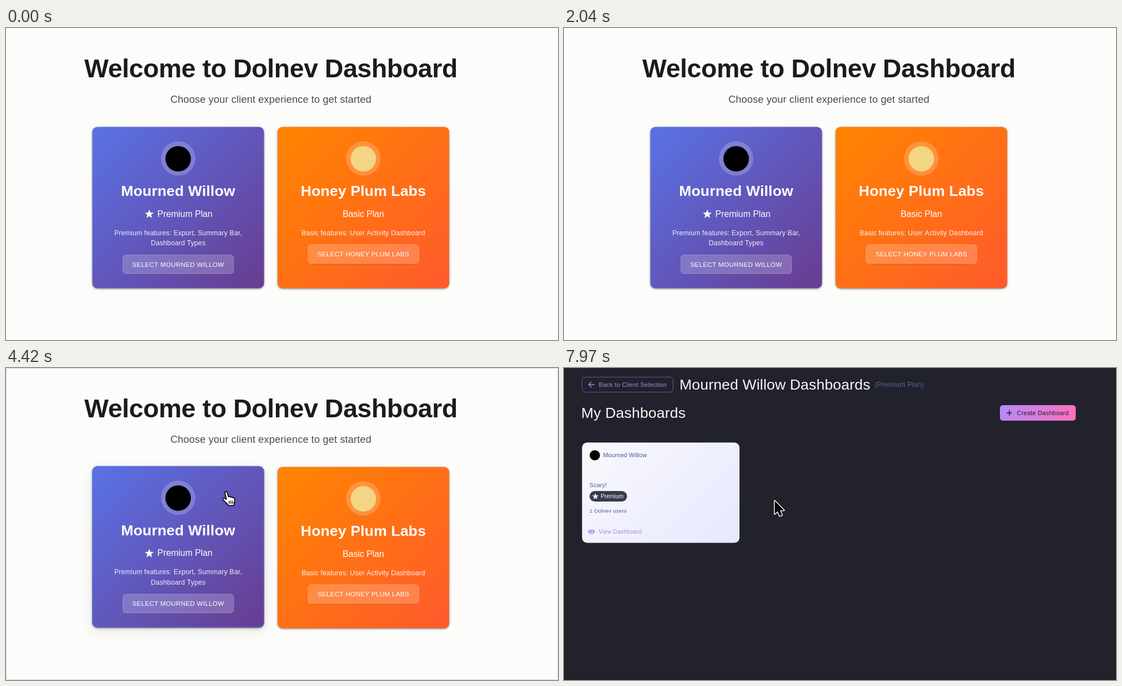
An HTML page with a canvas that plays this animation: 994x563 px, repeating every 7990 ms.

```html
<!DOCTYPE html>
<html lang="en">
<head>
<meta charset="utf-8">
<title>Dashboard selection</title>
<style>
  html, body { margin: 0; width: 100%; height: 100%; overflow: hidden; background: #fcfcfb; }
  canvas { display: block; width: 994px; height: 563px; }
</style>
</head>
<body>
<canvas id="stage"></canvas>
<script>
const W = 994, H = 563, LOOP = 7990;
const HOVER_AT = 4290, LOAD_AT = 6140, READY_AT = 6480;
const PREMIUM = 'Mourned Willow', BASIC = 'Honey Plum Labs', SERVICE = 'Dolnev';

const canvas = document.getElementById('stage');
const ctx = canvas.getContext('2d');
const dpr = window.devicePixelRatio || 1;
canvas.width = Math.round(W * dpr);
canvas.height = Math.round(H * dpr);

const clamp = v => Math.max(0, Math.min(1, v));
const ease = v => { v = clamp(v); return v * v * (3 - 2 * v); };
const span = (t, a, b) => clamp((t - a) / (b - a));

// Cursor hotspot: time, x, y
const cursorPath = [
  [2480, 640, -30], [2880, 576, 33], [3400, 556, 72],
  [4150, 482, 160], [4290, 440, 188], [4420, 396, 218], [4800, 379, 239]
];
const arrow = new Path2D('M0 0V23.5L5.3 18.6L9 27.2L13 25.5L9.3 17H16.6Z');
const hand = new Path2D('M4.2 3.2C4 .8 7.6 .2 8.4 2.6L10.6 10.4C12 9.4 13.8 9.8 14.4 11C15.6 10.2 17.4 10.6 18 12C19.6 11.4 21.2 12.2 21.6 14C22.4 17 22 20 20.6 22.6V26H10.2L9.8 24.4C7.4 22 4 18.6 1.2 16C-.4 14.2 1.4 12 3.6 13L7 15Z');
const fingers = new Path2D('M12 17.5V23M15 17.5V23M18 17.5V23');

function text(str, x, y, size, color, { align = 'left', weight = 400, ls = 0 } = {}) {
  ctx.font = `${weight} ${size}px "Liberation Sans", Arial, sans-serif`;
  ctx.letterSpacing = `${ls * size}px`;
  ctx.textAlign = align;
  ctx.fillStyle = color;
  ctx.fillText(str, x, y);
}

function box(x, y, w, h, r, fill, stroke, line = 1) {
  ctx.beginPath();
  ctx.roundRect(x, y, w, h, r);
  if (fill) { ctx.fillStyle = fill; ctx.fill(); }
  if (stroke) { ctx.strokeStyle = stroke; ctx.lineWidth = line; ctx.stroke(); }
}

function disc(x, y, r, fill) {
  ctx.beginPath();
  ctx.arc(x, y, r, 0, Math.PI * 2);
  ctx.fillStyle = fill;
  ctx.fill();
}

function lines(d, color, width) {
  ctx.strokeStyle = color;
  ctx.lineWidth = width;
  ctx.stroke(new Path2D(d));
}

function star(x, y, r, fill) {
  ctx.beginPath();
  for (let i = 0; i < 10; i++) {
    const a = i * Math.PI / 5 - Math.PI / 2, d = i % 2 ? r * 0.43 : r;
    ctx.lineTo(x + d * Math.cos(a), y + d * Math.sin(a));
  }
  ctx.fillStyle = fill;
  ctx.fill();
}

function gradient(x0, y0, x1, y1, from, to) {
  const g = ctx.createLinearGradient(x0, y0, x1, y1);
  g.addColorStop(0, from);
  g.addColorStop(1, to);
  return g;
}

function shadow(color, blur, y) {
  ctx.shadowColor = color;
  ctx.shadowBlur = blur * dpr;
  ctx.shadowOffsetY = y * dpr;
}
const noShadow = () => shadow('transparent', 0, 0);

function clientCard(c, hover) {
  const mid = c.x + 154.5;
  ctx.save();
  ctx.translate(0, -3.3 * hover);
  const fill = gradient(mid - 150, 174, mid + 150, 474, c.from, c.to);
  if (hover) {
    shadow(`rgba(0,0,0,${0.24 * hover})`, 20, 6);
    box(c.x, 178.5, 309, 291, 9, fill);
  }
  shadow('rgba(0,0,0,.5)', 3.5, 1.2);
  box(c.x, 178.5, 309, 291, 9, fill);
  noShadow();
  if (hover) box(c.x + 0.8, 179.3, 307.4, 289.4, 8.5, null, `rgba(90,114,230,${hover})`, 1.6);

  disc(mid, 235.5, 31, 'rgba(255,255,255,.2)');
  disc(mid, 236, 23, c.mark);
  text(c.name, mid, 303, 26.5, '#fff', { align: 'center', weight: 700, ls: 0.00735 });
  if (c.star) {
    star(258, 336, 8.4, '#fff');
    text(c.plan, 272.6, 340.5, 15.8, '#fff');
  } else {
    text(c.plan, mid, 340.5, 15.8, '#fff', { align: 'center' });
  }
  c.notes.forEach((n, i) =>
    text(n, mid, 373.5 + 18.5 * i, 12.35, 'rgba(255,255,255,.9)', { align: 'center', ls: 0.0107 }));

  const top = 391 + 18.5 * (c.notes.length - 1);
  box(mid - 99.5, top, 199.5, 34, 6, 'rgba(255,255,255,.2)', 'rgba(255,255,255,.25)');
  lines(`M${mid - 95} ${top + 35}H${mid + 95}`, 'rgba(0,0,0,.14)', 1);
  text('SELECT ' + c.name.toUpperCase(), mid, top + 21, 11.6, '#fff', { align: 'center', ls: 0.0286 });
  ctx.restore();
}

const premiumCard = {
  x: 155.5, from: '#5a72e6', to: '#683c90', mark: '#000', name: PREMIUM, plan: 'Premium Plan', star: true,
  notes: ['Premium features: Export, Summary Bar,', 'Dashboard Types']
};
const basicCard = {
  x: 489, from: '#ff8500', to: '#ff5a2c', mark: '#f3d583', name: BASIC, plan: 'Basic Plan',
  notes: ['Basic features: User Activity Dashboard']
};

function memoryTip(show) {
  const ink = '#f6f6f6';
  ctx.save();
  ctx.globalAlpha = show;
  box(728, -30, 300, 68, 11, '#dcdcdd');
  ctx.beginPath();
  ctx.arc(759.5, 4, 8.5, Math.PI * 0.78, Math.PI * 2.22);
  ctx.closePath();
  ctx.strokeStyle = ink;
  ctx.lineWidth = 2;
  ctx.stroke();
  lines('M759 6L764 0', ink, 2.4);
  text('Memory usage: 350 MB', 783.5, 11, 19.5, ink);
  ctx.restore();
}

function welcome(t) {
  ctx.fillStyle = '#fcfcfb';
  ctx.fillRect(0, 0, W, H);
  text(`Welcome to ${SERVICE} Dashboard`, 477, 89, 46.4, '#1b1b1f', { align: 'center', weight: 700, ls: -0.00833 });
  text('Choose your client experience to get started', 477, 135, 18.2, '#4c4c4c', { align: 'center', ls: 0.0075 });
  clientCard(premiumCard, ease(span(t, HOVER_AT, HOVER_AT + 300)));
  clientCard(basicCard, 0);
  const tip = Math.min(span(t, 1300, 1380), 1 - span(t, 1480, 1640));
  if (tip > 0) memoryTip(tip);
  if (t >= 2400) {
    ctx.strokeStyle = '#d2d1de';
    ctx.lineWidth = 1;
    ctx.strokeRect(0.5, 0.5, W - 1, H - 1);
  }
}

function darkPage() {
  ctx.fillStyle = '#21222c';
  ctx.fillRect(0, 0, W, H);
  lines('M0 562.5H994M.5 0V563', '#1b1626', 1);
}

function loading(t) {
  const p = (t - LOAD_AT) / 1400 % 1;
  const a = ease(p * 2), b = ease(p * 2 - 1);
  const start = p * Math.PI * 2 + (15 * a + 110 * b) / 20.2;
  const dash = Math.min(1 + 99 * a, 126.9 - 15 * a - 110 * b);
  ctx.beginPath();
  ctx.arc(477, 65, 13, start, start + Math.max(1, dash) / 20.2);
  ctx.strokeStyle = '#bd93f9';
  ctx.lineWidth = 2.3;
  ctx.stroke();
  text('Loading dashboards...', 477, 107, 18.2, '#f8f8f2', { align: 'center', ls: 0.0075 });
}

function dashboards() {
  const light = '#f8f8f2', violet = '#b085ee', slate = '#4c5b97', dark = '#1d1e28';
  box(32.5, 16.5, 164, 27, 5.5, null, '#69548f');
  lines('M55 30H44.5M49.5 25L44.5 30L49.5 35', violet, 1.4);
  text('Back to Client Selection', 62.6, 34, 10.9, violet, { ls: 0.0286 });
  text(`${PREMIUM} Dashboards`, 208, 39, 26.5, light, { ls: 0.00735 });
  text('(Premium Plan)', 560, 34, 12.4, '#56639a', { ls: 0.0094 });
  text('My Dashboards', 31, 90, 26.5, light, { ls: 0.00735 });

  box(785, 67, 136.5, 28, 5.5, gradient(785, 67, 921, 95, '#b58bfa', '#ff6fbc'));
  lines('M797.3 81H806.7M802 76.3V85.7', dark, 1.5);
  text('Create Dashboard', 815.5, 85, 10.85, dark, { ls: 0.0286 });

  box(32.5, 134.5, 283.5, 181, 9, gradient(58, 109, 290, 341, '#f9f9fb', '#e6e8ff'));
  disc(55.5, 157.5, 9.3, '#000');
  text(PREMIUM, 70.4, 160.5, 10.9, slate, { ls: 0.008 });
  text('Scary!', 45.8, 214.5, 10.9, slate, { ls: 0.0107 });
  box(46, 222, 67.5, 19, 9.5, '#393b4b');
  star(56.5, 231.8, 6, light);
  text('Premium', 66, 235, 10.3, light);
  text(`1 ${SERVICE} users`, 46, 260.5, 9.65, slate, { ls: 0.02 });

  ctx.fillStyle = violet;
  ctx.fill(new Path2D('M43 295.3C46 289.8 53 289.8 56 295.3C53 300.8 46 300.8 43 295.3Z'));
  disc(49.5, 295.3, 2.9, '#f2f2fc');
  disc(49.5, 295.3, 1.8, violet);
  text('View Dashboard', 62.4, 299, 10.1, violet, { ls: 0.0286 });
}

function cursor(t) {
  if (t < cursorPath[0][0]) return;
  let [, x, y] = cursorPath[cursorPath.length - 1];
  for (let i = 1; i < cursorPath.length; i++) {
    const a = cursorPath[i - 1], b = cursorPath[i];
    if (t < b[0]) {
      const k = span(t, a[0], b[0]);
      x = a[1] + (b[1] - a[1]) * k;
      y = a[2] + (b[2] - a[2]) * k;
      break;
    }
  }
  const pointing = t >= HOVER_AT && t < LOAD_AT;
  ctx.save();
  ctx.lineJoin = 'round';
  shadow('rgba(0,0,0,.3)', 3, 1);
  if (pointing) {
    ctx.translate(x - 6, y + 4);
    ctx.fillStyle = '#fff';
    ctx.fill(hand);
    noShadow();
    ctx.strokeStyle = '#000';
    ctx.lineWidth = 1.6;
    ctx.stroke(hand);
    ctx.lineWidth = 1.3;
    ctx.stroke(fingers);
  } else {
    ctx.translate(x + 0.5, y + 0.8);
    ctx.strokeStyle = '#fff';
    ctx.lineWidth = 3;
    ctx.stroke(arrow);
    noShadow();
    ctx.fillStyle = '#000';
    ctx.fill(arrow);
  }
  ctx.restore();
}

function draw() {
  const t = performance.now() % LOOP;
  ctx.setTransform(dpr, 0, 0, dpr, 0, 0);
  if (t < LOAD_AT) {
    welcome(t);
  } else {
    darkPage();
    if (t < READY_AT) loading(t);
    else dashboards();
  }
  cursor(t);
  requestAnimationFrame(draw);
}
draw();
</script>
</body>
</html>
```
